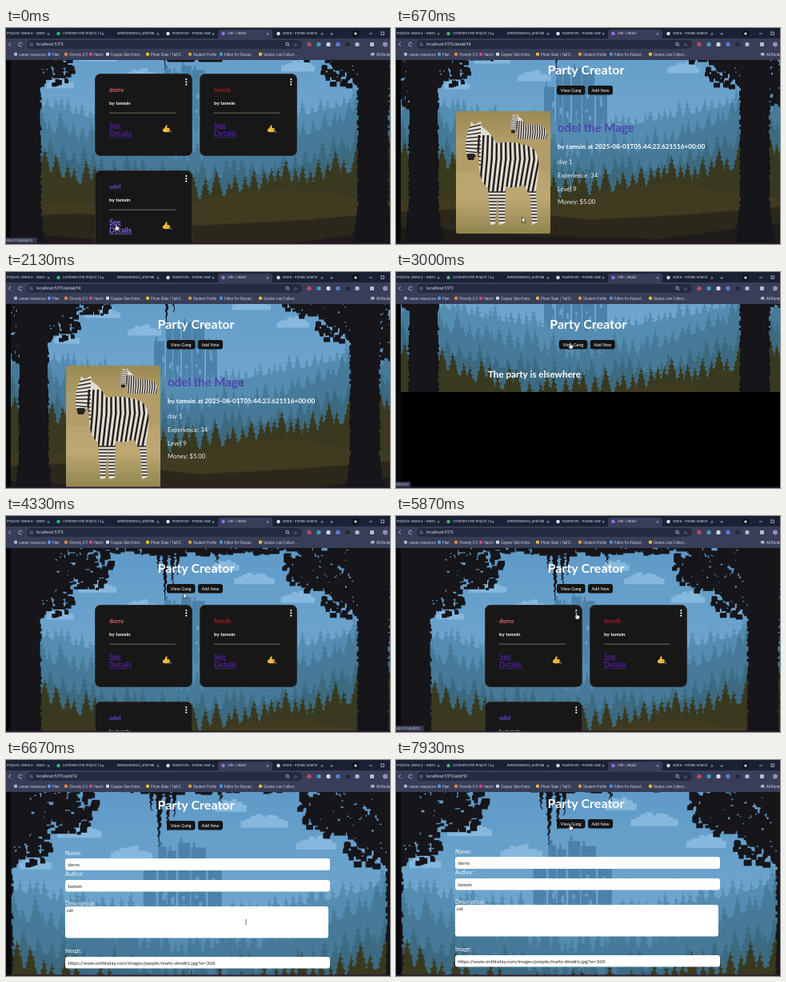
An HTML page with a canvas that plays this animation: 480 px wide and 270 px high, repeating every 8 s.

```html
<!DOCTYPE html>
<html lang="en">
<head>
<meta charset="utf-8">
<title>Party Creator</title>
<style>
html, body { margin: 0; width: 100%; height: 100%; overflow: hidden; background: #000; }
canvas { display: block; width: 480px; height: 270px; }
</style>
</head>
<body>
<canvas id="stage"></canvas>
<script>
const LOOP = 8000, TOP = 40, SCENE_H = 314;
const stage = document.getElementById('stage');
const dpr = window.devicePixelRatio || 1;
stage.width = 480 * dpr;
stage.height = 270 * dpr;
const g = stage.getContext('2d');
const UI = 'Inter, sans-serif', PAGE = 'Lato, sans-serif';

let seed = 17;
const rnd = () => (seed = (seed * 16807) % 2147483647) / 2147483647;

// Piecewise linear value; points are [position, value].
function lerp(points, at) {
  if (at <= points[0][0]) return points[0][1];
  for (let i = 1; i < points.length; i++) {
    const [a, va] = points[i - 1], [b, vb] = points[i];
    if (at <= b) return va + (vb - va) * (at - a) / (b - a);
  }
  return points[points.length - 1][1];
}
const smooth = k => k * k * (3 - 2 * k);

/* ---------- forest backdrop, drawn once ---------- */
function buildScene() {
  const c = document.createElement('canvas');
  c.width = 480;
  c.height = SCENE_H;
  const s = c.getContext('2d');
  const px = (x, y, w, h) => s.fillRect(Math.round(x), Math.round(y), w, h);

  const sky = s.createLinearGradient(0, 0, 0, 200);
  sky.addColorStop(0, '#5f9ac8');
  sky.addColorStop(1, '#78add0');
  s.fillStyle = sky;
  s.fillRect(0, 0, 480, SCENE_H);

  s.fillStyle = '#86b8de';
  for (const [x, y, w] of [[306, 40, 46], [172, 72, 40], [358, 62, 38], [120, 50, 44], [272, 24, 30], [75, 82, 30]]) {
    for (let i = 0; i < 9; i++) {
      const h = 3 + 9 * Math.sin(Math.PI * (i + .5) / 9) * (.5 + rnd() / 2);
      px(x - w / 2 + i * w / 9, y - h, Math.ceil(w / 9) + 1, Math.round(h) + 3);
    }
  }

  s.fillStyle = '#4c82aa';
  for (const [x, y, w] of [[185, 82, 13], [200, 62, 8], [209, 66, 9], [220, 58, 12], [233, 63, 15], [250, 84, 14]]) {
    px(x, y, w, 90);
    px(x + 2, y - 5, 2, 6);
  }
  s.fillStyle = '#6a9fc6';
  for (let i = 0; i < 14; i++) px(186 + rnd() * 72, 90 + rnd() * 40, 3, 3 + rnd() * 6);

  function ridge(color, points, tall, gap) {
    s.fillStyle = color;
    for (let x = 0; x < 480; x += 2) px(x, lerp(points, x), 2, SCENE_H);
    for (let x = 0; x < 484; x += gap * (.6 + rnd() * .8)) {
      const h = tall * (.5 + rnd() * .6), base = lerp(points, x) + 3;
      for (let y = 0; y < h; y += 2) {
        const half = Math.max(.5, y * .24 + (y % 6) * .35 - .7);
        px(x - half, base - h + y, Math.ceil(half * 2), 2);
      }
    }
  }
  ridge('#558db2', [[0, 92], [120, 122], [240, 138], [360, 118], [480, 88]], 22, 9);
  ridge('#467a98', [[0, 118], [110, 150], [220, 172], [310, 164], [390, 132], [480, 110]], 30, 10);
  ridge('#3c6a80', [[0, 145], [110, 178], [230, 196], [340, 184], [480, 142]], 26, 11);
  ridge('#39391f', [[0, 168], [60, 184], [110, 204], [190, 222], [300, 212], [390, 194], [480, 168]], 34, 12);
  ridge('#403a20', [[0, 222], [120, 222], [200, 230], [290, 208], [350, 204], [480, 222]], 4, 7);
  ridge('#2b281b', [[0, 238], [100, 234], [240, 248], [360, 242], [480, 232]], 4, 6);
  ridge('#1e1c19', [[0, 256], [160, 268], [330, 272], [480, 252]], 5, 5);

  s.fillStyle = '#15151a';
  for (const x of [17, 431]) {
    for (let y = 0; y < SCENE_H; y += 3) {
      const flare = Math.max(0, y - 225) * .13 + Math.max(0, 70 - y) * .12;
      const wobble = Math.round(rnd() * 2);
      px(x - flare - wobble, y, Math.round(35 + 2 * flare + wobble * 2), 3);
    }
  }
  const leaf = (cx, cy, rx, ry, n) => {
    for (let i = 0; i < n; i++) {
      const a = rnd() * 6.283, r = Math.pow(rnd(), .6), d = 3 + rnd() * 5;
      px(cx + Math.cos(a) * r * rx - d / 2, cy + Math.sin(a) * r * ry - d / 2, Math.round(d), Math.round(d * .8));
    }
  };
  for (const side of [0, 1]) {
    const at = x => side ? 480 - x : x;
    leaf(at(20), 30, 70, 55, 620);
    leaf(at(80), 18, 58, 34, 420);
    leaf(at(10), 80, 28, 30, 150);
    leaf(at(66), 62, 26, 22, 90);
    leaf(at(110), 34, 22, 18, 70);
  }
  leaf(240, 0, 120, 9, 300);
  for (const [x, w, len] of [[200, 8, 62], [209, 7, 46], [215, 6, 32], [192, 6, 26], [262, 6, 18]])
    for (let y = 0; y < len; y += 2) px(x - w / 2 * (1 - y / len) + rnd() * 1.5, y, Math.max(1, Math.round(w * (1 - y / len))), 2);
  return c;
}
const scene = buildScene();

/* ---------- drawing helpers ---------- */
function box(x, y, w, h, color, r = 0) {
  g.fillStyle = color;
  g.beginPath();
  g.roundRect(x, y, w, h, r);
  g.fill();
}
function dot(x, y, r, color) {
  g.fillStyle = color;
  g.beginPath();
  g.arc(x, y, r, 0, 7);
  g.fill();
}
function text(str, x, y, size, color = '#fff', weight = 400, font = PAGE, align = 'left') {
  g.font = `${weight} ${size}px ${font}`;
  g.fillStyle = color;
  g.textAlign = align;
  g.fillText(str, x, y);
}
function shape(points, color) {
  g.fillStyle = color;
  g.beginPath();
  points.forEach(([x, y]) => g.lineTo(x, y));
  g.closePath();
  g.fill();
}
function line(points, color, width) {
  g.strokeStyle = color;
  g.lineWidth = width;
  g.beginPath();
  points.forEach(([x, y]) => g.lineTo(x, y));
  g.stroke();
}
function backdrop(scale, height) {
  const h = SCENE_H * scale, w = 480 * scale;
  g.save();
  g.beginPath();
  g.rect(0, TOP, 480, height);
  g.clip();
  g.drawImage(scene, 240 - w / 2, TOP + (height - h) / 2, w, h);
  g.restore();
}
function header(dx = 0) {
  text('Party Creator', 237.5 + dx, 71, 16, '#fff', 700, PAGE, 'center');
  for (const [label, x, w] of [['View Gang', 201, 35.5], ['Add New', 240, 31]]) {
    box(x + dx, 85, w, 11.5, '#141414', 3);
    text(label, x + dx + w / 2, 92.6, 5.4, '#fff', 400, PAGE, 'center');
  }
}

/* ---------- pages ---------- */
function thumb(x, y) {
  g.save();
  g.translate(x, y);
  shape([[-4, 0], [-2, -1], [0, -5], [1.5, -5], [1.3, -1.4], [4.4, -1.2], [4.8, 0], [4, 3.6], [-1, 3.8], [-4, 2.8]], '#f3bd3d');
  line([[1.2, .2], [4.4, .2]], '#bd8122', .5);
  line([[1.2, 1.9], [4.2, 1.9]], '#bd8122', .5);
  g.restore();
}
function card(x, y, name, color, hover) {
  box(x, y, 122, 103, '#414547', 7);
  box(x + .6, y + .6, 120.8, 101.8, '#171718', 6.5);
  text(name, x + 18, y + 22.5, 7.5, color, 700);
  text('by tamsin', x + 18, y + 39, 6.2, '#fff', 700);
  box(x + 18, y + 48.7, 83, .8, '#8a8a76');
  const link = hover ? '#8c62ef' : '#51209f';
  ['See', 'Details'].forEach((word, i) => {
    const base = y + 67.5 + i * 10.5;
    text(word, x + 18, base, 9, link, 700);
    box(x + 18, base + 1, i ? 29 : 15.5, .7, link);
  });
  thumb(x + 89, y + 69.5);
  text('0', x + 93.5, y + 74, 4, '#ddd');
  for (const d of [7, 10.3, 13.6]) dot(x + 114.3, y + d, 1.1, '#fff');
}
function cardsPage(t) {
  backdrop(1.05, 330);
  header();
  card(111, 111, 'dorro', '#e06a6a');
  card(242, 111, 'fennik', '#aa1c25');
  card(111, 232, 'odel', '#5b50d6', t < 1000);
}
function zebra(x, y, scale) {
  g.save();
  g.translate(x, y);
  g.scale(scale, scale);
  const body = new Path2D('M12 50Q11 30 18 18L19 13L23 17L31 13L32 19Q45 28 50 40Q74 36 94 45Q106 53 103 76L100 100L102 139L95 142L93 108L85 92Q70 98 62 94L61 140L54 142L52 104L49 141L43 142L40 96Q29 88 29 68L27 50L22 61L15 61Z');
  g.fillStyle = '#e2ddd3';
  g.fill(body);
  g.clip(body);
  for (let i = 0; i < 15; i++) {
    const sx = 29 + i * 5.5;
    line([[sx, 30], [sx - 2 + i * .4, 60], [sx - 5, 101]], '#24211f', 2.5);
  }
  for (let i = 0; i < 11; i++) line([[10, 22 + i * 4], [31, 17 + i * 5]], '#2b2725', 1.4);
  for (let i = 0; i < 10; i++) line([[36, 101 + i * 4], [106, 101 + i * 4]], '#2b2725', 1.6);
  box(12, 53, 13, 10, '#262221', 4);
  g.restore();
}
function photo(x, y) {
  g.save();
  g.beginPath();
  g.roundRect(x, y, 118, 153, 2);
  g.clip();
  const grass = g.createLinearGradient(0, y, 0, y + 153);
  grass.addColorStop(0, '#9a8a55');
  grass.addColorStop(.25, '#b39c66');
  grass.addColorStop(.7, '#bda873');
  grass.addColorStop(1, '#90854f');
  box(x, y, 118, 153, grass);
  zebra(x + 62, y - 3, .5);
  box(x, y + 35, 118, 40, '#b29c67');
  zebra(x, y, 1);
  g.restore();
}
function detailPage() {
  backdrop(1, 243);
  header();
  photo(75, 117);
  text('odel the Mage', 202, 142.5, 15, '#4e46ad', 700);
  text('by tamsin at 2025-08-01T05:44:23.621516+00:00', 202, 164, 8.2, '#fff', 700);
  ['day 1', 'Experience: 34', 'Level 9', 'Money: $5.00'].forEach((row, i) =>
    text(row, 202, 183.2 + i * 16.7, 7.7, '#eef2f5'));
}
function emptyPage() {
  backdrop(1, 110);
  header(2.7);
  text('The party is elsewhere', 115, 131.5, 11.6, '#fff', 700);
}
function editPage() {
  backdrop(1.24, 390);
  header();
  const fields = [
    ['Name:', 127.5, 132, 331, 15, 'dorro'],
    ['Author:', 154, 159, 331, 14.5, 'tamsin'],
    ['Description:', 190.5, 192, 329, 39.5, 'cat'],
    ['Image:', 250, 255, 331, 14.5, 'https://www.onthisday.com/images/people/marlo-dendric.jpg?w=360']
  ];
  for (const [label, ly, y, w, h, value] of fields) {
    text(label, 74, ly, 7, '#f2f6f9');
    box(74, y, w, h, '#fff', 3);
    if (h > 20) text(value, 75.5, y + 6.5, 6.2, '#222');
    else text(value, 77.5, y + 9.5, 6, '#222');
  }
}

/* ---------- browser frame ---------- */
function browser(path) {
  box(0, 0, 480, 14, '#1b2135');
  box(0, 13, 480, 27, '#383d58');
  box(265, 2, 68, 14, '#383d58', 4);
  const tabs = [
    [1, 'Projects: Week 8 - WEB1', 53], [71, 'Corinna’s First Project | v', 121, '#35b86b'],
    [139, 'tamsin/web102_unit7lab', 190], [208, 'mushroom - Pondel Sear', 259, '#dfe4ee'],
    [277, 'Vite + React', 327, '#a06bf0'], [346, 'zebra - Pondel Search', 395, '#dfe4ee']
  ];
  for (const [x, label, close, icon] of tabs) {
    text(label, x, 8.4, 4.1, '#dde0ea', 400, UI);
    text('×', close, 8.8, 6, '#c6cada', 400, UI, 'center');
    if (icon) dot(x - 5.5, 7, 2.2, icon);
  }
  text('+', 407, 9, 7, '#d6d9e4', 400, UI, 'center');
  box(433, 3, 8, 8, '#11141f', 1.5);
  dot(437, 7, 1.6, '#e4e6ee');
  line([[454, 7], [458, 7]], '#d6d9e4', .7);
  g.strokeRect(469, 5, 3.6, 3.6);

  line([[6, 18], [3.5, 20.5], [6, 23]], '#cdd1df', .8);
  g.beginPath();
  g.arc(18, 20.5, 2.3, .6, 6);
  g.stroke();
  box(26, 15, 344, 11, '#262a40', 5.5);
  dot(31.5, 20.5, 2.6, '#4a506b');
  text('localhost:5173' + path, 38, 22.3, 5, '#e8eaf2', 400, UI);
  g.beginPath();
  g.arc(351.5, 20, 1.8, 0, 7);
  g.moveTo(353, 21.5);
  g.lineTo(354.5, 23);
  g.stroke();
  text('☆', 362, 22.6, 6, '#cdd1df', 400, '"DejaVu Sans", sans-serif', 'center');
  ['#b94c63', '#3b9bc4', '#d3d8e5', '#597edb', '#22263a', '#aeb5c7'].forEach((c, i) => box(376.5 + i * 12, 18, 5, 5, c, 1.5));
  box(455, 18, 5, 5, '#b6bdce', 1);
  dot(474, 20.5, 3, '#9b8ab4');

  const marks = [
    [16, 'career resources', '#aeb4c6'], [58, 'Plan', '#5b94e8'], [79, 'Chorely 2.0', '#e48a3c'],
    [110, 'Hatch', '#c94f7b'], [131, 'Copper Glen Enter...', '#d6d9e2'], [181, 'Photo Slate | Tall D...', '#e8b742'],
    [234, 'Student Profile', '#dd9a3d'], [273, 'Editor for Educat...', '#4497de'], [322, 'Guides Join Collect...', '#e0c04e']
  ];
  for (const [x, label, color] of marks) {
    box(x - 6, 30.8, 4, 4, color, 1);
    text(label, x, 34.6, 4.2, '#dde0ea', 400, UI);
  }
  box(456, 31, 4.5, 3.6, '#aeb4c6', .6);
  text('All Bookmarks', 463, 34.6, 4.2, '#dde0ea', 400, UI);
}
function statusBubble(label) {
  const w = label.length * 2.05 + 2;
  box(-3, 262, w + 3, 7, '#343950', 2);
  text(label, 0, 267, 4, '#d8dbe6', 400, UI);
}
const pointers = {
  arrow: [[0, 0], [0, 7], [1.7, 5.6], [2.9, 8], [4, 7.5], [2.9, 5.2], [5, 5]],
  hand: [[0, 0], [1.3, 0], [1.5, 3], [4.7, 3.7], [4.5, 6], [3.6, 8], [.3, 8], [-2, 4.7], [-1.2, 4.2], [0, 5.2]]
};
function cursor(kind, x, y) {
  g.save();
  g.translate(x, y);
  if (kind === 'beam') line([[0, -3], [0, 4]], '#222', .7);
  else {
    shape(pointers[kind], '#fff');
    g.strokeStyle = '#111';
    g.lineWidth = .6;
    g.stroke();
  }
  g.restore();
}

/* ---------- timeline ---------- */
const pages = [
  { until: 450, draw: cardsPage, path: '' },
  { until: 2720, draw: detailPage, path: '/detail/14' },
  { until: 3270, draw: emptyPage, path: '' },
  { until: 6130, draw: cardsPage, path: '' },
  { until: LOOP, draw: editPage, path: '/edit/12' }
];
const scrolls = [[0, 54], [449, 54], [450, 13], [1600, 13], [1850, 0], [6330, 0], [6600, 9], [6930, 9], [7130, 11]];
const moves = [
  [0, 137, 245], [450, 137, 245], [1200, 235, 203], [1500, 235, 203], [2100, 296, 139], [2600, 217, 88],
  [3550, 217, 88], [3870, 222, 96], [4330, 222, 96], [4700, 150, 175], [5130, 250, 190], [5750, 225, 121],
  [6200, 225, 121], [6600, 300, 202], [6950, 300, 202], [7700, 216, 80], [8000, 217, 80]
];
const hovers = [
  [0, 450, 'ost:5173/detail/14'], [2560, 3800, 'ost:5173'], [4600, 4780, 'ost:5173/detail/12'], [5650, 6130, 'ost:5173/edit/12'], [7680, 8000, '']
];
function pointerAt(t) {
  const i = Math.max(1, moves.findIndex(m => m[0] >= t));
  const [a, ax, ay] = moves[i - 1], [b, bx, by] = moves[i];
  const k = smooth((t - a) / (b - a));
  return [ax + (bx - ax) * k, ay + (by - ay) * k];
}
function frame(now) {
  const t = now % LOOP;
  const page = pages.find(p => t < p.until);
  const hover = hovers.find(([from, to]) => t >= from && t < to);
  g.setTransform(dpr, 0, 0, dpr, 0, 0);
  box(0, 0, 480, 270, '#000');
  g.save();
  g.translate(0, -lerp(scrolls, t));
  page.draw(t);
  g.restore();
  box(0, TOP, 6, 230, '#08080b');
  browser(page.path);
  box(0, 268.6, 480, 1.4, '#2c1a31');
  if (hover && hover[2]) statusBubble(hover[2]);
  const overText = t > 1950 && t < 2250 || t > 6450 && t < 7150;
  cursor(hover ? 'hand' : overText ? 'beam' : 'arrow', ...pointerAt(t));
}
const start = performance.now();
(function tick() {
  frame(performance.now() - start);
  requestAnimationFrame(tick);
})();
</script>
</body>
</html>
```
